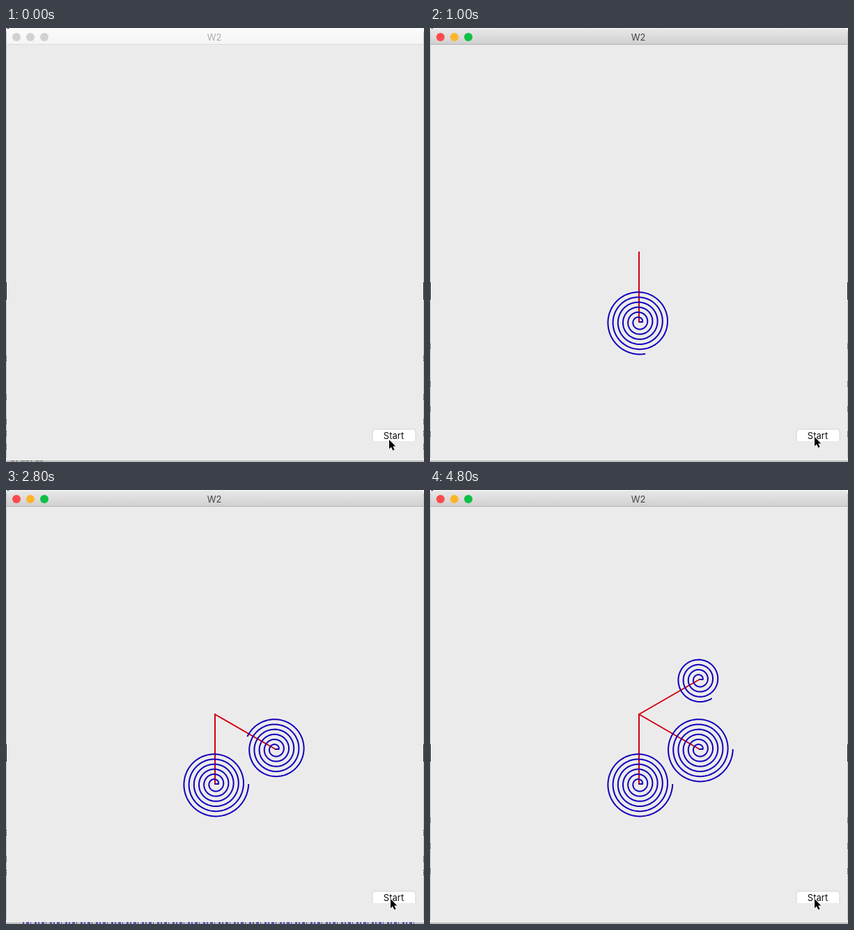
An HTML page for the animation above (5 s loop, 600 by 623 pixels).

```html
<!DOCTYPE html>
<html lang="en">
<head>
<meta charset="utf-8">
<title>W2</title>
<style>
  html, body { margin: 0; width: 100%; height: 100%; overflow: hidden; background: #ecebec; }
  svg { display: block; width: 100%; height: 100%; }
  text { font: 13px Inter, Roboto, sans-serif; text-anchor: middle; }
  .arm, .spiral { fill: none; stroke-width: 2; stroke-linejoin: round; }
  .arm { stroke: #d0000f; stroke-linecap: square; }
  .spiral { stroke: #1000bc; }
</style>
</head>
<body>
<svg viewBox="0 0 600 623">
  <defs>
    <linearGradient id="active" x2="0" y2="1">
      <stop stop-color="#e9e8e9"/><stop offset="1" stop-color="#d0cfd0"/>
    </linearGradient>
    <linearGradient id="idle" x2="0" y2="1">
      <stop stop-color="#fbfbfb"/><stop offset="1" stop-color="#f5f4f5"/>
    </linearGradient>
  </defs>

  <rect width="600" height="623" fill="#fafafa"/>
  <path id="corner" d="M2 0h2v3h-2z"/>
  <path d="M0 6q0-5 5-5h590q5 0 5 5v611q0 5-5 5h-590q-5 0-5-5z" fill="#ecebec"/>
  <path id="bar" d="M0 6q0-5 5-5h590q5 0 5 5v18h-600z"/>
  <path id="rule" d="M0 23.5h600" stroke-width="1"/>
  <path d="M.5 5v612M599.5 5v612" stroke="#c4c3c4"/>
  <path d="M0 621.5h600" stroke="#a5a4a5"/>
  <path d="M0 622.5h600" stroke="#d8d7d8"/>
  <path d="M.5 365v25M599.5 365v25" stroke="#222"/>
  <path id="specks" stroke="#555" stroke-dasharray="2 1"/>
  <path id="under" d="M7 621.5h46" stroke="#444" stroke-dasharray="5 2 3 4 6 1"/>
  <path id="dots" d="M24 621.5h566" stroke="#2724a0" stroke-width="2" stroke-dasharray="2 3 4 2 1 5 3 2"/>
  <g id="lights"><circle cx="15"/><circle cx="35"/><circle cx="55"/></g>
  <text id="title" x="299" y="18">W2</text>

  <g id="drawing"></g>

  <path d="M526 593v-13q0-4 4-4h54q4 0 4 4v13z" fill="#fff"/>
  <path d="M526 593v-13q0-4 4-4h54q4 0 4 4v13" fill="none" stroke="#cbcacb" stroke-width=".8"/>
  <text x="556.5" y="590" fill="#111">Start</text>
  <path id="cursor" d="M0 0v13.2l3-2.8 2.3 5.2 2.3-1-2.3-5h4z" stroke="#fff" stroke-width="1.2" paint-order="stroke"/>
</svg>

<script>
const LOOP = 5000, STEP = 200, TURNS = 6;
const NS = "http://www.w3.org/2000/svg";
const hub = { x: 300, y: 322 }, reach = 100;

// Each arm shows at `from`; its spiral advances `rate` degrees per ms since `start`.
const arms = [
  { angle: 90, from: 200, start: -3, rate: 2.075 },
  { angle: 30, from: 1200, start: 1030, rate: 1.105 },
  { angle: -30, from: 3200, start: 3076, rate: 0.8025 }
];
const specks = [
  [0, [470, 526, 561, 578, 597]],
  [200, [453, 507, 543, 579]],
  [1200, [488, 526, 545]],
  [3200, [470, 507, 543]]
];

const el = id => document.getElementById(id);
const rad = deg => deg * Math.PI / 180;
const set = (node, attrs) => {
  for (const key in attrs) node.setAttribute(key, attrs[key]);
};
const addPath = name => {
  const path = document.createElementNS(NS, "path");
  set(path, { class: name });
  return el("drawing").appendChild(path);
};

for (const arm of arms) {
  arm.x = hub.x + reach * Math.cos(rad(arm.angle));
  arm.y = hub.y + reach * Math.sin(rad(arm.angle));
  arm.line = addPath("arm");
  arm.curl = addPath("spiral");
  set(arm.line, { d: `M${hub.x} ${hub.y}L${arm.x} ${arm.y}` });
}

function spiral(cx, cy, end) {
  let d = `M${cx} ${cy}`;
  for (let a = 0; ; a = Math.min(a + 6, end)) {
    const r = 5 + a * 0.02;
    const x = cx + r * Math.cos(rad(a)), y = cy - r * Math.sin(rad(a));
    d += `L${x.toFixed(2)} ${y.toFixed(2)}`;
    if (a >= end) return d;
  }
}

function draw(time) {
  const t = Math.floor(time % LOOP / STEP) * STEP;
  const on = t >= STEP;
  const colors = on ? ["#fc4b4e", "#fdb52c", "#0dc143"] : Array(3).fill("#d2d1d2");

  set(el("bar"), { fill: on ? "url(#active)" : "url(#idle)" });
  set(el("rule"), { stroke: on ? "#b3b2b3" : "#dddcdd" });
  set(el("title"), { fill: on ? "#444" : "#aaa" });
  [...el("lights").children].forEach((c, i) => set(c, { cy: 13, r: 6, fill: colors[i] }));
  set(el("cursor"), { transform: on ? "translate(552 587)" : "translate(550 591)" });
  set(el("corner"), { fill: on && t < 4200 ? "#126b2a" : "#222" });
  set(el("under"), { visibility: on ? "hidden" : "visible" });
  set(el("dots"), { visibility: t >= 1200 && t < 3200 ? "visible" : "hidden" });

  const rows = specks.filter(([from]) => t >= from).pop()[1];
  set(el("specks"), { d: rows.map(y => `M.5 ${y}v9M599.5 ${y}v9`).join("") });

  for (const arm of arms) {
    const visibility = t >= arm.from ? "visible" : "hidden";
    const end = Math.max(0, Math.min(TURNS * 360, (t - arm.start) * arm.rate));
    set(arm.line, { visibility });
    set(arm.curl, { visibility, d: spiral(arm.x, arm.y, end) });
  }
}

const begin = performance.now();
function tick() {
  draw(performance.now() - begin);
  requestAnimationFrame(tick);
}
tick();
</script>
</body>
</html>
```
